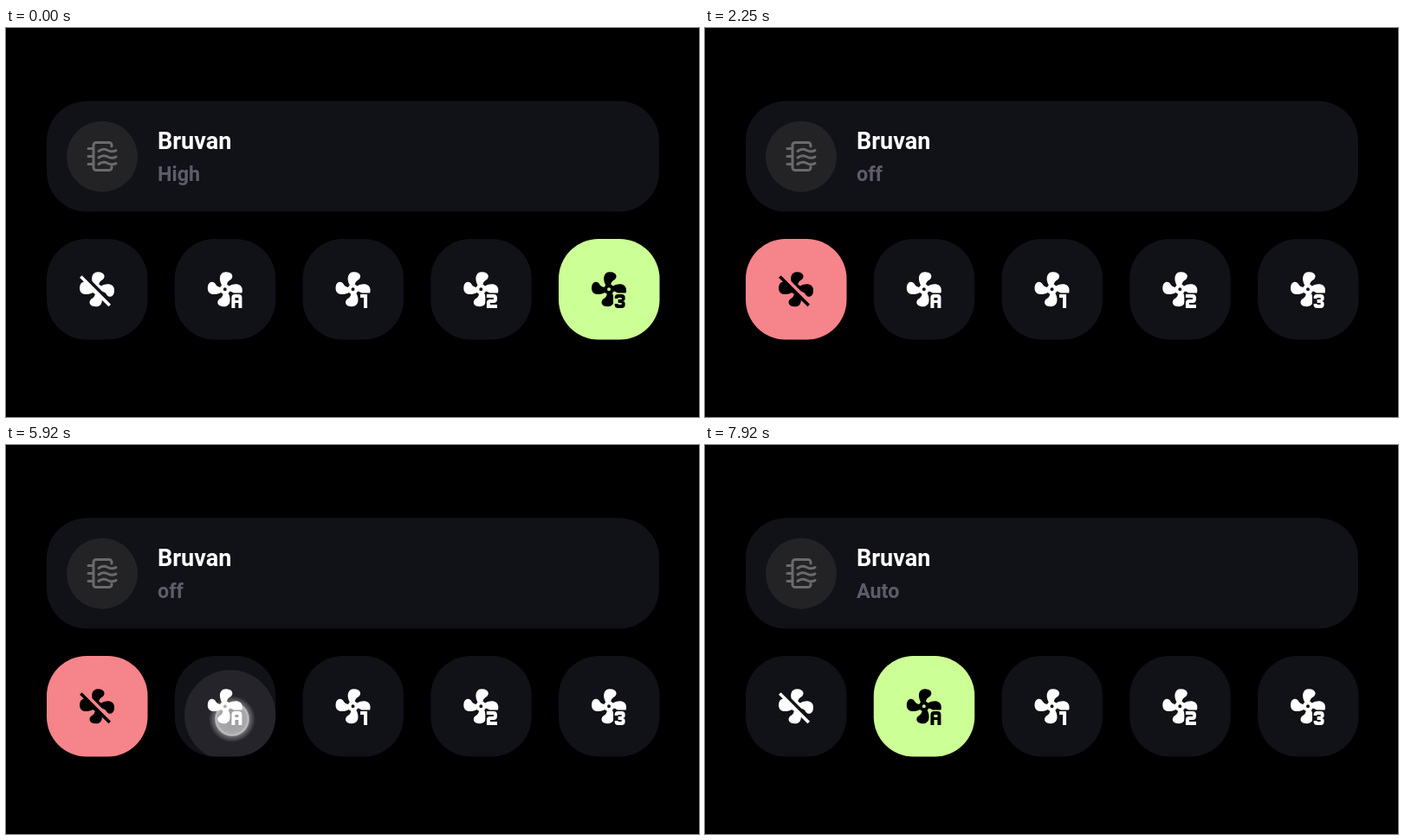
An HTML page that plays this animation: 800 px wide and 450 px high, repeating every 8 s.

```html
<!DOCTYPE html>
<html lang="en">
<head>
<meta charset="utf-8">
<title>Fan card</title>
<style>
  html, body { margin: 0; width: 100%; height: 100%; overflow: hidden; background: #000; }
  svg { display: block; width: 100vw; height: 100vh; }
  text { font-family: Roboto, "Open Sans", sans-serif; }
  .name { font-size: 27px; font-weight: 600; fill: #fff; }
  .state { font-size: 23.3px; font-weight: 600; fill: #5e5c69; }
</style>
</head>
<body>
<svg id="stage" viewBox="0 0 800 450">
  <defs>
    <radialGradient id="glow">
      <stop offset="0" stop-color="#fff" stop-opacity=".55"/>
      <stop offset=".6" stop-color="#fff" stop-opacity=".6"/>
      <stop offset=".7" stop-color="#fff" stop-opacity=".72"/>
      <stop offset=".76" stop-color="#fff" stop-opacity=".3"/>
      <stop offset="1" stop-color="#fff" stop-opacity="0"/>
    </radialGradient>
  </defs>
  <rect width="800" height="450"/>
  <rect x="47" y="84.5" width="707" height="128" rx="46" fill="#111118"/>
  <circle cx="111" cy="148.7" r="41" fill="#232326"/>
  <g fill="none" stroke="#6a6a6d" stroke-width="3" stroke-linecap="round" stroke-linejoin="round">
    <path d="M122 137V135.5A3 3 0 0 0 119 132.5H104A3 3 0 0 0 101 135.5V161.5A3 3 0 0 0 104 164.5H119A3 3 0 0 0 122 161.5V160.5"/>
    <path d="M95 139.5H100M95 148.5H100M95 157.5H100"/>
    <path id="wave" d="M107 142.5C111 139 114.500 140 117.500 141.500S124 143.500 127 141.500"/>
    <use href="#wave" y="7.500"/>
    <use href="#wave" y="15"/>
  </g>
  <text class="name" x="175" y="140">Bruvan</text>
  <text class="state" id="state" x="175" y="177"></text>
</svg>
<script>
const LOOP = 8000, TOP = 244, SIZE = 116.5, STEP = 147.75;
const CARD = [17, 17, 24], GREEN = [204, 255, 149], RED = [246, 132, 139];

const FAN = 'M12 11A1 1 0 0 0 11 12A1 1 0 0 0 12 13A1 1 0 0 0 13 12A1 1 0 0 0 12 11M12.5 2C17 2 17.1 5.6 14.75 6.75C13.8 7.2 13.3 8.3 13.1 9.2C13.6 9.4 14 9.7 14.35 10.1C18 8.1 22 8.9 22 12.5C22 17 18.5 17.1 17.3 14.7C16.8 13.7 15.7 13.3 14.8 13.1C14.6 13.6 14.3 14 13.9 14.3C15.9 18 15.1 22 11.500 22C7 22 6.900 18.400 9.300 17.200C10.250 16.700 10.700 15.700 10.900 14.800C10.400 14.600 10 14.300 9.650 13.900C6 15.850 2 15 2 11.500C2 7 5.600 6.900 6.700 9.300C7.200 10.200 8.300 10.700 9.200 10.900C9.400 10.400 9.700 10 10.100 9.650C8.150 6 8.900 2 12.500 2Z';
const FAN_OFF = 'M12.5 2C9.6 2 8.6 4.5 9.3 7.5L15 13.2C15.9 13.4 16.8 13.8 17.3 14.7C18.5 17.1 22 17 22 12.5C22 8.9 18 8.1 14.35 10.1C14 9.7 13.6 9.4 13.1 9.2C13.3 8.3 13.8 7.2 14.75 6.75C17.1 5.6 17 2 12.500 2M3.300 4L2 5.300L4.500 7.700C3.200 7.700 2 8.900 2 11.500C2 15 6 15.850 9.650 13.900C10 14.300 10.400 14.600 10.900 14.800C10.700 15.700 10.250 16.700 9.300 17.200C6.900 18.400 7 22 11.500 22C13.800 22 14.900 20.400 14.900 18.200L18.700 22L20 20.700Z';

const MARKS = [
  null,
  { left: 15.8, d: 'M0 8V2A2 2 0 0 1 2 0H4A2 2 0 0 1 6 2V8H4V5H2V8ZM2 2V3.500H4V2Z' },
  { left: 16.25, d: 'M0 0V2H2V8H4V0Z' },
  { left: 15.3, d: 'M0 0H4A2 2 0 0 1 6 2V3A2 2 0 0 1 4 5H2V6H6V8H0V5A2 2 0 0 1 2 3H4V2H0Z' },
  { left: 15.3, d: 'M0 2.500V2A2 2 0 0 1 2 0H4A2 2 0 0 1 6 2V2.500A1.500 1.500 0 0 1 4.500 4A1.500 1.500 0 0 1 6 5.500V6A2 2 0 0 1 4 8H2A2 2 0 0 1 0 6V5.500H2V6H4V5H2V3H4V2H2V2.500Z' }
];

const STATES = [
  { at: 0, text: 'High', on: 4 },
  { at: 1535, text: 'off', on: 0 },
  { at: 6115, text: 'Auto', on: 1 }
];
const FADE = 300;
const TAPS = [
  { at: 1168, button: 0, x: 127, y: 309 },
  { at: 5838, button: 1, x: 261, y: 317 }
];

const stage = document.getElementById('stage');
const label = document.getElementById('state');

function add(parent, tag, attrs) {
  const el = document.createElementNS('http://www.w3.org/2000/svg', tag);
  set(el, attrs);
  parent.append(el);
  return el;
}
function set(el, attrs) {
  for (const key in attrs) el.setAttribute(key, attrs[key]);
}
const clamp = v => Math.min(1, Math.max(0, v));
const mix = (a, b, p) => a + (b - a) * p;
const rgb = (a, b, p) => `rgb(${a.map((v, i) => Math.round(mix(v, b[i], p)))})`;

function bezier(x1, y1, x2, y2) {
  const at = (a, b, u) => 3 * a * u * (1 - u) ** 2 + 3 * b * u * u * (1 - u) + u ** 3;
  return x => {
    let lo = 0, hi = 1;
    for (let i = 0; i < 20; i++) {
      const mid = (lo + hi) / 2;
      if (at(x1, x2, mid) < x) lo = mid; else hi = mid;
    }
    return at(y1, y2, (lo + hi) / 2);
  };
}
const ease = bezier(.25, .1, .25, 1);
const standard = bezier(.4, 0, .2, 1);

const buttons = MARKS.map((mark, i) => {
  const x = 47 + i * STEP, cx = x + SIZE / 2, cy = TOP + SIZE / 2;
  const box = { x, y: TOP, width: SIZE, height: SIZE, rx: 46 };
  const back = add(stage, 'rect', box);
  add(add(stage, 'clipPath', { id: 'box' + i }), 'rect', box);
  const icon = add(stage, 'g', { transform: `translate(${cx - 24.2} ${cy - 24}) scale(2)`, 'fill-rule': 'evenodd' });
  if (mark) {
    const cut = mark.left - .8;
    add(add(icon, 'clipPath', { id: 'cut' + i }), 'path', { d: `M0 0H24V14.1H${cut}V24H0Z` });
    add(icon, 'path', { d: FAN, 'clip-path': `url(#cut${i})` });
    add(icon, 'path', { d: mark.d, transform: `translate(${mark.left} 14.9)` });
  } else {
    add(icon, 'path', { d: FAN_OFF });
  }
  const ripple = add(add(stage, 'g', { 'clip-path': `url(#box${i})` }), 'circle', { fill: '#fff' });
  return { back, icon, ripple, cx, cy, color: i ? GREEN : RED };
});
const dot = add(stage, 'circle', { r: 27, fill: 'url(#glow)' });

function draw(t) {
  const now = STATES.filter(s => s.at <= t).length - 1;
  const { at, text, on } = STATES[now];
  const before = now ? STATES[now - 1].on : on;
  const p = ease(clamp((t - at) / FADE));
  if (label.textContent !== text) label.textContent = text;

  buttons.forEach((b, i) => {
    const level = i === on ? (now ? p : 1) : i === before ? 1 - p : 0;
    b.back.setAttribute('fill', rgb(CARD, b.color, level));
    b.icon.setAttribute('fill', i === on ? '#000' : '#fff');
    b.ripple.setAttribute('opacity', 0);
  });

  dot.setAttribute('opacity', 0);
  for (const tap of TAPS) {
    const age = t - tap.at;
    if (age < 0 || age > 420) continue;
    const b = buttons[tap.button];
    const grow = standard(clamp(age / 225));
    set(b.ripple, {
      cx: mix(tap.x, b.cx, grow * .5),
      cy: mix(tap.y, b.cy, grow * .5),
      r: mix(11.6, 87, grow),
      opacity: .08 * clamp(age / 75) * (1 - clamp((age - 225) / 150))
    });
    set(dot, { cx: tap.x, cy: tap.y, opacity: 1 - clamp((age - 130) / 160) });
  }
}

const start = performance.now();
function tick() {
  draw((performance.now() - start) % LOOP);
  requestAnimationFrame(tick);
}
draw(0);
requestAnimationFrame(tick);
</script>
</body>
</html>
```
